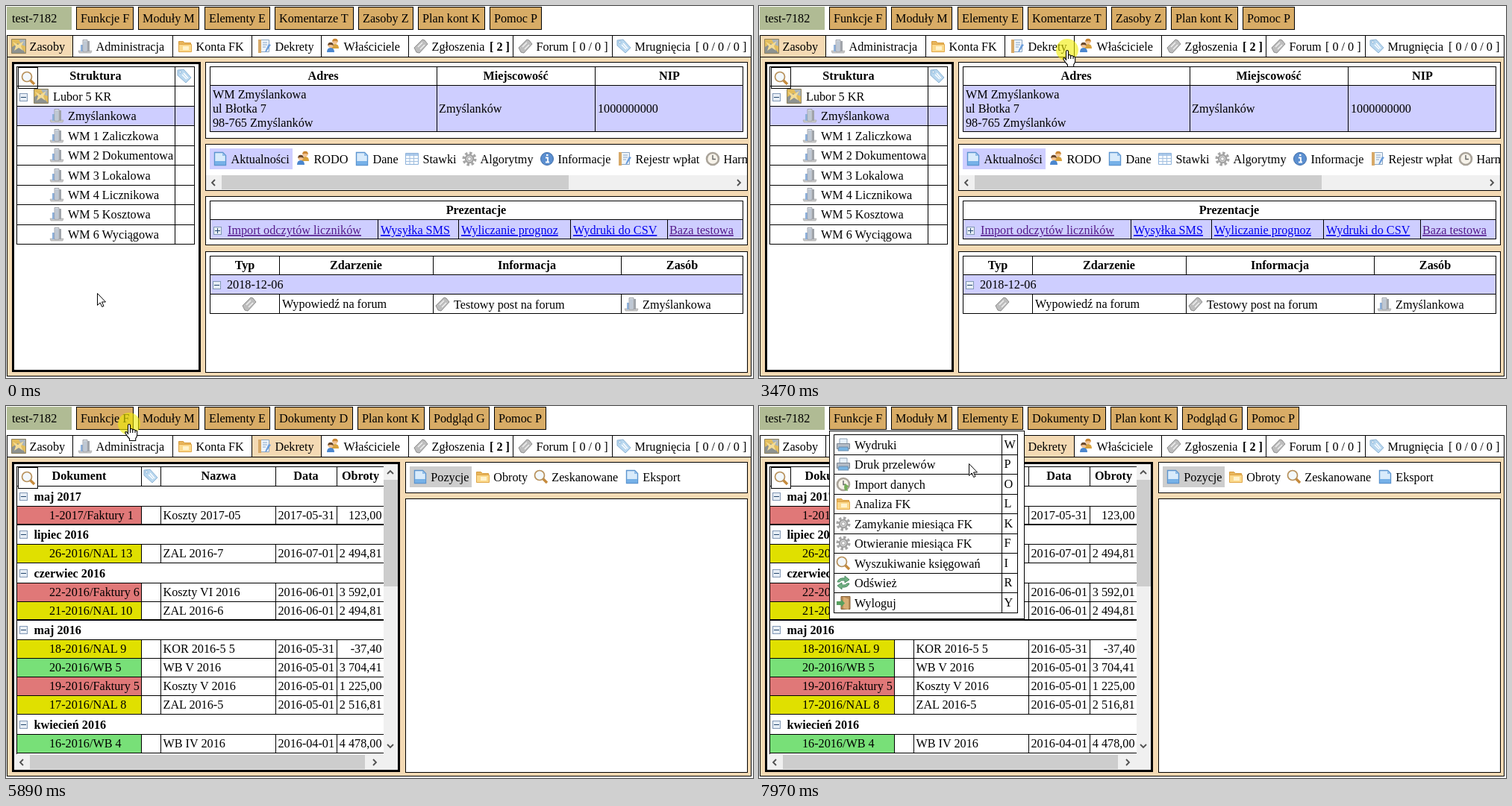
These frames come from a looping animation (1001x499 px, 8000 ms). An HTML page:

```html
<!DOCTYPE html>
<html lang="pl">
<head>
<meta charset="utf-8">
<style>
html, body { margin: 0; width: 100%; height: 100%; overflow: hidden; background: #fff; }
svg { display: block; font: 16.2px "Liberation Serif", "Times New Roman", serif; }
rect { shape-rendering: crispEdges; }
text { white-space: pre; }
</style>
</head>
<body>
<svg id="stage" width="1001" height="499" viewBox="0 0 1001 499"></svg>
<script>
const BEIGE = '#f4dab4', BUTTON = '#d8ac66', LILAC = '#ceceff', GRAY = '#cdcdcd';
const RED = '#e07878', YELLOW = '#e0e000', GREEN = '#78e078';
const LOOP = 8000, STEP = 77;

// Drawing helpers; edges are inclusive pixel coordinates.
const fill = (x0, y0, x1, y1, color) =>
  `<rect x="${x0}" y="${y0}" width="${x1 - x0 + 1}" height="${y1 - y0 + 1}" fill="${color}"/>`;
const box = (x0, y0, x1, y1, color = '#fff', border = 1) =>
  fill(x0, y0, x1, y1, '#000') + fill(x0 + border, y0 + border, x1 - border, y1 - border, color);
const hline = (y, x0, x1) => fill(x0, y, x1, y, '#000');
const vline = (x, y0, y1) => fill(x, y0, x, y1, '#000');
const text = (x, y, s, attrs = '') => `<text x="${x}" y="${y}" ${attrs}>${s}</text>`;
const head = (x, y, s) => text(x, y, s, 'text-anchor="middle" font-weight="bold"');
const bold = (x, y, s) => text(x, y, s, 'font-weight="bold"');
const icon = (name, x, y) => `<use href="#${name}" x="${x}" y="${y}"/>`;
const shape = (d, color, stroke = 'none', width = 1) =>
  `<path d="${d}" fill="${color}" stroke="${stroke}" stroke-width="${width}"/>`;
const disc = (x, y, r, color, stroke = 'none', width = 1) =>
  `<circle cx="${x}" cy="${y}" r="${r}" fill="${color}" stroke="${stroke}" stroke-width="${width}"/>`;
const person = (x, y, hair, coat) =>
  shape(`M${x - 5} ${y + 11}q0-6 5-6t5 6z`, coat) + disc(x, y + 1.5, 3.5, '#f2c290') +
  shape(`M${x - 3.8} ${y + 2}a3.8 4.2 0 0 1 7.6 0q-4-2-7.6 0z`, hair);
const clockFace = disc(10, 10, 8, '#f7f3ea', '#aaa49a', 2.6) + shape('M10 5v5.5h4', 'none', '#666', 1.4);

const icons = {
  map: shape('M.5 .5h19v19H.5z', '#e3bd5c', '#8f8360') + shape('M1 11l8-5 10 13H1z', '#8d9290') +
    shape('M10 1h9v9l-5-2z', '#a9b4bb') + shape('M2 4l7 4 8-5-4 7 3 6-6-4-6 4 2-6z', '#f3dc97'),
  building: shape('M1 16h18l-1 3H2z', '#c9c9c9', '#a2a2a2', .6) + shape('M4 8h4v9H4z', '#8fb2dc') +
    shape('M7 1.500h6V17H7z', '#dfe2e6', '#8e949c', .8) + shape('M13 3h3v14h-3z', '#a0a4aa') +
    shape('M9 3v13M11 3v13', 'none', '#98a9bf', .9),
  folder: shape('M1.5 3.5h6l2 2h8v3H1.5z', '#e8b55b', '#d69b3d') + shape('M1.5 7.5h17v10h-17z', '#fbd98c', '#e0a648') +
    shape('M7 10h8v5H7z', '#fff3cd'),
  ledger: shape('M4.5 1.5h12v16h-12z', '#eef4fa', '#8ba5c0') + shape('M2 1h4v18H2z', '#d7a968') +
    shape('M8 5h6M8 8h6M8 11h4', 'none', '#88a6c8') + shape('M16 7l3 1-6 9-2 1 1-3z', '#6b9ddb'),
  people: person(13, 2, '#c98632', '#d8a13c') + person(7, 7, '#6c4a2c', '#4b87cf'),
  ticket: shape('M1 12 12 1l3 1 4 5L8 19l-4-1z', '#bdbdbd', '#8d8d8d') +
    shape('M6 11l6-6M9 14l6-6', 'none', '#f2f2f2', 1.4),
  tag: shape('M1 2 9 1 19 12 12 19 1 9z', '#b8d7ef', '#8fb4d4') + disc(4.5, 4.5, 1.5, '#fff', '#8fb4d4') +
    shape('M9 6l6 7M7 8l6 6', 'none', '#fff', 1.3),
  lens: shape('M12 12l6 6', 'none', '#c58a3c', 3.4) + disc(8, 8, 6.5, '#f3f8fc', '#b7905a', 1.7),
  page: shape('M2.5 1.5h11l4 4v13h-15z', '#d9ebfb', '#5b94cf', 1.4) + shape('M13 2v4h4z', '#8ebce8') +
    shape('M3 13h14v5H3z', '#76b1e8'),
  grid: shape('M1.5 2.5h17v15h-17z', '#f7fbff', '#8fb3da') + shape('M2 3h16v3H2z', '#a9c8ea') +
    shape('M2 9.5h16M2 13.5h16M7 3v14M12.5 3v14', 'none', '#a4c0df'),
  gear: disc(10, 10, 7.8, 'none', '#a5a5a5', 3.5).replace('/>', ' stroke-dasharray="3.4 2.7"/>') +
    disc(10, 10, 5.2, '#d2d2d2', '#a0a0a0', 2) + disc(10, 10, 2.4, '#fff', '#999'),
  info: disc(10, 10, 8.5, '#5b8fd0', '#3f6da8') + shape('M8 8.5h3v6h2M8 14.5h5M9 5h2.5', 'none', '#fff', 1.8),
  clock: clockFace,
  printer: shape('M5 2h10v7H5z', '#e9f3fb', '#8ca0b4') + shape('M1.5 8.5h17v7h-17z', '#b4bcc6', '#7c8793') +
    shape('M4 13h12l1 5H3z', '#78b4e2', '#6c8dab'),
  import: clockFace + shape('M12 9l6 4-3 1 1 5-4-1-1-4z', '#74ad58'),
  refresh: shape('M2 9q2-6 10-5V1l6 5-6 4V7q-5-1-7 2z', '#71b184', '#4b8a60') +
    shape('M18 11q-2 6-10 5v3l-6-5 6-4v3q5 1 7-2z', '#71b184', '#4b8a60'),
  door: shape('M7 1.5h12v17H7z', '#b98b55', '#86623a') + shape('M10 2l7 3v14l-7-1z', '#d9ae75') +
    shape('M1 8h6V5l5 5.5-5 5.5v-3H1z', '#58a05f'),
};

const toggle = (x, y, plus) => `<g transform="translate(${x} ${y})">` +
  fill(-5, -5, 5, 5, '#8298b5') + fill(-4, -4, 4, 4, '#e6edf5') +
  fill(-3, 0, 3, 0, '#24476e') + (plus ? fill(0, -3, 0, 3, '#24476e') : '') + '</g>';

const chevron = (x, y, turn) =>
  `<path d="M-4 2 0-2 4 2" fill="none" stroke="#505050" stroke-width="1.8" transform="translate(${x} ${y}) rotate(${turn})"/>`;

const button = (left, right, label) => box(left, 1, right - 1, 31, BUTTON) + text(left + 6, 22, label);

const lensBox = box(16, 82, 42, 110) + icon('lens', 20, 87);

function frameAndTabs() {
  return fill(1, 1, 87, 31, '#b0bb94') + text(8, 22, 'test-7182') +
    button(94, 171, 'Funkcje F') + button(177, 259, 'Moduły M') + button(266, 354, 'Elementy E') +
    box(1, 39, 998, 68) + box(1, 68, 998, 496, BEIGE);
}

function tabLabels() {
  const tabs = [['map', 7, 'Zasoby'], ['building', 96, 'Administracja'], ['folder', 230, 'Konta FK'],
    ['ledger', 336, 'Dekrety'], ['people', 428, 'Właściciele'], ['ticket', 546, 'Zgłoszenia'],
    ['ticket', 686, 'Forum'], ['tag', 818, 'Mrugnięcia']];
  return tabs.map(([name, x, label]) => icon(name, x, 44) + text(x + 24.5, 60, label)).join('') +
    bold(648, 60, '[ 2 ]') + text(759, 60, '[ 0 / 0 ]') + text(924, 60, '[ 0 / 0 / 0 ]') +
    [89, 223, 329, 422, 539, 679, 812].map(x => vline(x, 39, 68)).join('');
}

function treePanel() {
  const names = ['Zmyślankowa', 'WM 1 Zaliczkowa', 'WM 2 Dokumentowa', 'WM 3 Lokalowa',
    'WM 4 Licznikowa', 'WM 5 Kosztowa', 'WM 6 Wyciągowa'];
  let out = box(8, 75, 260, 490, '#fff', 3) + box(14, 81, 252, 319) + fill(15, 135, 251, 159, LILAC) +
    vline(226, 81, 319) + head(120, 99, 'Struktura') + lensBox + icon('tag', 229, 84) +
    toggle(23, 122) + icon('map', 37, 111) + text(63, 127, 'Lubor 5 KR');
  for (let i = 0; i < 8; i++) out += hline(Math.round(107 + 26.5 * i), 14, 252);
  names.forEach((name, i) => {
    const y = Math.round(153.4 + 26.4 * i);
    out += icon('building', 58, y - 16) + text(83, y, name);
  });
  return out;
}

function addressPanel() {
  return box(267, 75, 993, 177) + box(273, 81, 987, 168, LILAC) + fill(274, 82, 986, 105, '#fff') +
    hline(106, 273, 987) + vline(577, 81, 168) + vline(789, 81, 168) +
    head(425, 99, 'Adres') + head(683, 99, 'Miejscowość') + head(889, 99, 'NIP') +
    text(277, 124, 'WM Zmyślankowa') + text(277, 143, 'ul Błotka 7') + text(277, 162, '98-765 Zmyślanków') +
    text(580, 143, 'Zmyślanków') + text(793, 143, '1000000000');
}

function newsPanel() {
  const items = [['page', 277, 'Aktualności'], ['people', 388, 'RODO'], ['page', 467, 'Dane'],
    ['grid', 534, 'Stawki'], ['gear', 611, 'Algorytmy'], ['info', 715, 'Informacje'],
    ['ledger', 819, 'Rejestr wpłat'], ['clock', 937, 'Harmonogram']];
  return box(267, 185, 993, 247) + fill(273, 191, 383, 218, LILAC) + '<g clip-path="url(#strip)">' +
    items.map(([name, x, label]) => icon(name, x, 195) + text(x + 24.5, 211, label)).join('') + '</g>' +
    fill(268, 227, 992, 246, '#f0f0f0') + fill(289, 227, 753, 245, GRAY) +
    chevron(278, 237, -90) + chevron(982, 237, 90);
}

function linksPanel() {
  const link = (x, label, color) => text(x, 306, label, `fill="${color}" text-decoration="underline"`);
  return box(267, 255, 993, 320) + box(273, 261, 987, 312, LILAC) + fill(274, 262, 986, 285, '#fff') +
    hline(286, 273, 987) + [498, 606, 756, 886].map(x => vline(x, 286, 312)).join('') +
    head(630, 279, 'Prezentacje') + toggle(283, 301, true) +
    link(297, 'Import odczytów liczników', '#551a8b') + link(502, 'Wysyłka SMS', '#00e') +
    link(610, 'Wyliczanie prognoz', '#00e') + link(760, 'Wydruki do CSV', '#00e') +
    link(889, 'Baza testowa', '#551a8b');
}

function eventsPanel() {
  return box(267, 329, 993, 491) + box(273, 335, 987, 412) + fill(274, 361, 986, 385, LILAC) +
    hline(360, 273, 987) + hline(386, 273, 987) +
    [366, 572, 824].map(x => vline(x, 335, 360) + vline(x, 386, 412)).join('') +
    head(320, 353, 'Typ') + head(469, 353, 'Zdarzenie') + head(698, 353, 'Informacja') + head(906, 353, 'Zasób') +
    toggle(282, 374) + text(296, 379, '2018-12-06') + icon('ticket', 316, 390) +
    text(370, 405, 'Wypowiedź na forum') + icon('ticket', 575, 390) + text(600, 406, 'Testowy post na forum') +
    icon('building', 828, 390) + text(853, 406, 'Zmyślankowa');
}

function resourcesView() {
  return button(360, 466, 'Komentarze T') + button(472, 546, 'Zasoby Z') +
    button(552, 642, 'Plan kont K') + button(648, 718, 'Pomoc P') +
    fill(2, 40, 88, 67, BEIGE) + treePanel() + addressPanel() + newsPanel() + linksPanel() + eventsPanel();
}

function documentTable() {
  const columns = [181, 207, 361, 443];
  const monthHeight = 26.4, rowHeight = 25;
  const months = [
    ['maj 2017', [[RED, '1-2017/Faktury 1', 'Koszty 2017-05', '2017-05-31', '123,00']]],
    ['lipiec 2016', [[YELLOW, '26-2016/NAL 13', 'ZAL 2016-7', '2016-07-01', '2 494,81']]],
    ['czerwiec 2016', [[RED, '22-2016/Faktury 6', 'Koszty VI 2016', '2016-06-01', '3 592,01'],
      [YELLOW, '21-2016/NAL 10', 'ZAL 2016-6', '2016-06-01', '2 494,81']]],
    ['maj 2016', [[YELLOW, '18-2016/NAL 9', 'KOR 2016-5 5', '2016-05-31', '-37,40'],
      [GREEN, '20-2016/WB 5', 'WB V 2016', '2016-05-01', '3 704,41'],
      [RED, '19-2016/Faktury 5', 'Koszty V 2016', '2016-05-01', '1 225,00'],
      [YELLOW, '17-2016/NAL 8', 'ZAL 2016-5', '2016-05-01', '2 516,81']]],
    ['kwiecień 2016', [[GREEN, '16-2016/WB 4', 'WB IV 2016', '2016-04-01', '4 478,00']]],
  ];
  const rules = (y0, y1) => columns.map(x => vline(x, y0, y1)).join('');
  let out = hline(81, 14, 505) + vline(14, 81, 466) + rules(81, 107) +
    head(98, 99, 'Dokument') + icon('tag', 184, 84) + head(285, 99, 'Nazwa') +
    head(402, 99, 'Data') + head(475, 99, 'Obroty');
  let y = 107.5;
  for (const [month, rows] of months) {
    out += hline(Math.floor(y), 14, 505) + toggle(23, Math.floor(y) + 14) + bold(37.5, Math.round(y + 19.5), month);
    y += monthHeight;
    for (const [color, doc, name, date, sum] of rows) {
      const top = Math.round(y), bottom = Math.round(y + rowHeight), base = top + 18;
      out += fill(15, top, 180, bottom, color) + hline(top, 14, 505) + hline(bottom, 14, 505) + rules(top, bottom) +
        text(58, base, doc) + text(210.5, base, name) + text(364.5, base, date) +
        text(503.5, base, sum, 'text-anchor="end"');
      y += rowHeight;
    }
    y = Math.max(y, 107.5);
  }
  return out;
}

function documentsView() {
  const tools = [['page', 545, 'Pozycje'], ['folder', 629, 'Obroty'], ['lens', 707, 'Zeskanowane'], ['page', 829, 'Eksport']];
  return button(360, 465, 'Dokumenty D') + button(471, 561, 'Plan kont K') +
    button(567, 648, 'Podgląd G') + button(654, 724, 'Pomoc P') +
    fill(330, 40, 421, 67, BEIGE) + box(8, 75, 527, 490, '#fff', 3) + documentTable() +
    fill(506, 78, 524, 466, '#f0f0f0') + fill(506, 99, 524, 241, GRAY) + chevron(515, 89, 0) + chevron(515, 456, 180) +
    fill(11, 467, 524, 487, '#f0f0f0') + fill(32, 468, 480, 486, GRAY) + chevron(21, 478, -90) + chevron(494, 478, 90) +
    box(535, 75, 993, 116) + fill(541, 81, 623, 108, GRAY) +
    tools.map(([name, x, label]) => icon(name, x, 85) + text(x + 24.3, 101, label)).join('') +
    box(535, 124, 993, 491);
}

function dropdown() {
  const items = [['printer', 'Wydruki', 'W'], ['printer', 'Druk przelewów', 'P'], ['import', 'Import danych', 'O'],
    ['folder', 'Analiza FK', 'L'], ['gear', 'Zamykanie miesiąca FK', 'K'], ['gear', 'Otwieranie miesiąca FK', 'F'],
    ['lens', 'Wyszukiwanie księgowań', 'I'], ['refresh', 'Odśwież', 'R'], ['door', 'Wyloguj', 'Y']];
  return box(94, 33, 355, 285) + box(100, 38, 346, 277) + vline(325, 38, 277) +
    items.map(([name, label, key], i) => {
      const top = Math.floor(38.5 + 26.5 * i), base = Math.round(58 + 26.45 * i);
      return hline(top, 100, 346) + icon(name, 103, base - 16) +
        text(128, base, label) + text(328.5, base - 1, key);
    }).join('');
}

const arrow = shape('M.5 .5V16.5L4.2 13 6.7 18.5 9 17.5 6.5 12H11.5Z', '#fff', '#000');
const hand = shape('M-1.5 14V2Q-1.5.5 0 .5T1.5 2V8Q1.5 6.5 3 6.5T4.7 8V9Q5 7.3 6.5 7.5T8 9V10' +
  'Q8.5 8.5 9.7 9T10.7 10.5V15Q10.5 17.5 8.7 19.5V22.5H.5V20Q-2.5 17-5 12.5-5.7 10.5-4 10.5-3 10.7-1.5 13Z' +
  'M1.5 8V12M4.7 8V12M8 9V12', '#fff', '#000', 1.1);

const layer = (id, content) => `<g id="${id}">${content}</g>`;
const defs = Object.entries(icons).map(([name, art]) => layer(name, art)).join('');

document.getElementById('stage').innerHTML =
  `<defs>${defs}<clipPath id="strip"><path d="M268 186H993V227H268Z"/></clipPath></defs>` +
  frameAndTabs() + layer('resources', resourcesView()) + layer('documents', documentsView()) +
  layer('search', lensBox) + tabLabels() + layer('menu', dropdown()) +
  layer('click', disc(0, 0, 15, '#f0ec00').replace('/>', ' opacity=".6"/>')) +
  layer('cursor', layer('arrow', arrow) + layer('hand', hand));

// Each move: start time, steps, end x, end y, pointer shape.
const moves = [
  [0, 1, 122, 385, 'arrow'],
  [1240, 8, 384, 67, 'arrow'],
  [1856, 3, 378, 72, 'arrow'],
  [2090, 5, 413, 60, 'hand'],
  [2630, 1, 413, 59, 'hand'],
  [3640, 1, 413, 59, 'arrow'],
  [4480, 3, 245, 60, 'hand'],
  [4710, 4, 168, 30, 'hand'],
  [5260, 1, 165, 24, 'hand'],
  [7280, 8, 280, 77, 'arrow'],
  [7970, 1, 281, 77, 'arrow'],
];
const ease = p => p * p * (3 - 2 * p);

function pointerAt(t) {
  const i = moves.findLastIndex(move => move[0] <= t);
  const [start, steps, x, y, kind] = moves[i];
  const [, , fromX, fromY] = moves[Math.max(0, i - 1)];
  const p = ease(Math.min(1, (Math.floor((t - start) / STEP) + 1) / steps));
  return { x: Math.round(fromX + (x - fromX) * p), y: Math.round(fromY + (y - fromY) * p), kind };
}

const el = id => document.getElementById(id);
const show = (id, visible) => { el(id).style.display = visible ? '' : 'none'; };
const place = (id, x, y) => el(id).setAttribute('transform', `translate(${x} ${y})`);

function render(t) {
  const { x, y, kind } = pointerAt(t);
  place('cursor', x, y);
  place('click', x, y);
  show('arrow', kind === 'arrow');
  show('hand', kind === 'hand');
  show('click', (t >= 3470 && t < 3640) || (t >= 5890 && t < 6120));
  show('resources', t < 3640);
  show('documents', t >= 3640);
  show('search', t >= 4480);
  show('menu', t >= 6120);
}

const began = performance.now();
function tick() {
  render((performance.now() - began) % LOOP);
  requestAnimationFrame(tick);
}
tick();
</script>
</body>
</html>
```
